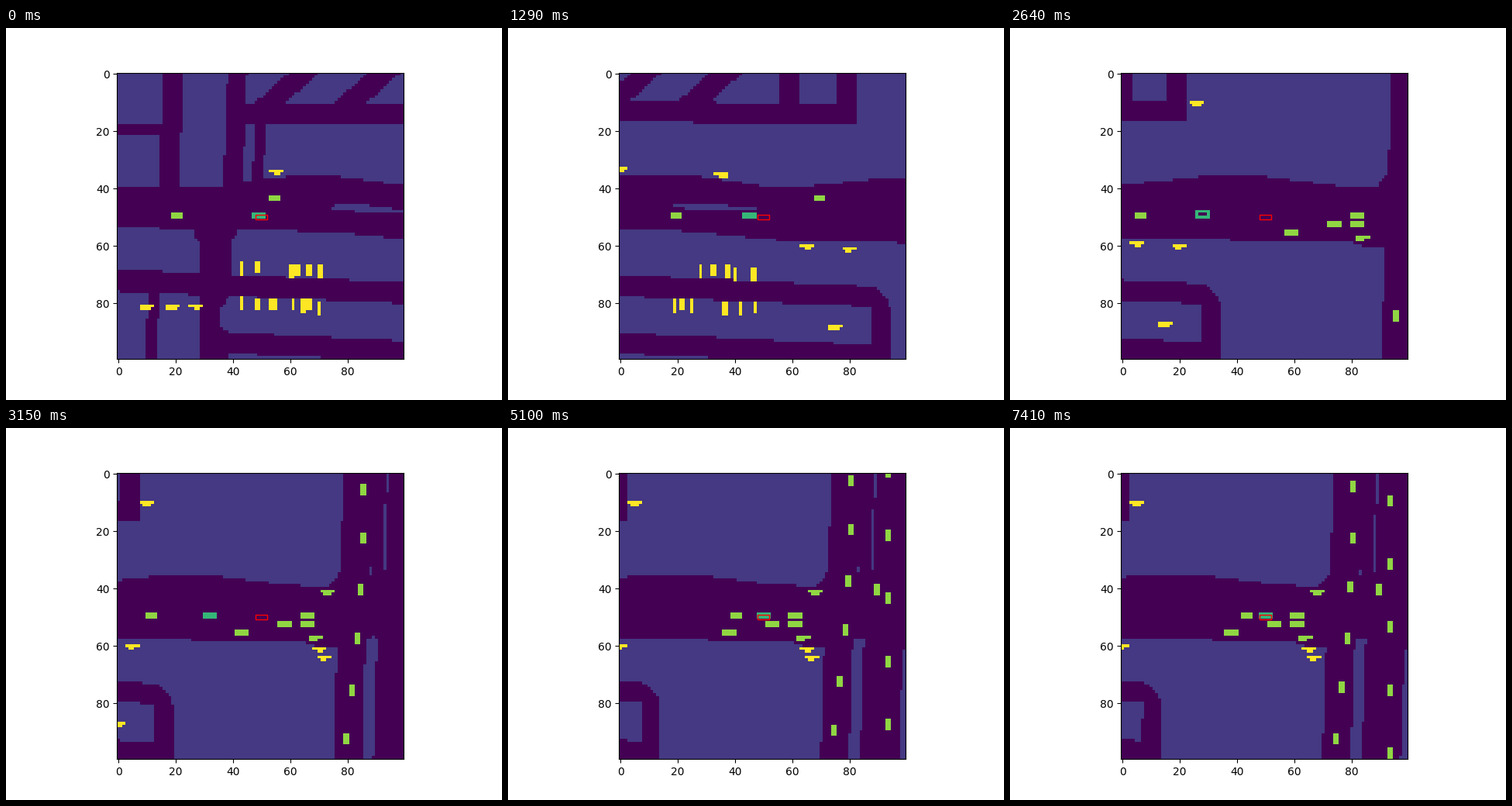
A matplotlib script for the animation above (7.44 s loop, 640x480 px).

```python
import random

import numpy as np
import matplotlib.pyplot as plt
from matplotlib.animation import FuncAnimation
from matplotlib.patches import Rectangle

N, FRAMES, STEP = 100, 248, 30
EGO, CAR, PED = 4, 5, 6
random.seed(4)


def curve(x, *knots):
    xs, ys = zip(*knots)
    return np.interp(x, xs, ys)


# Camera: forward travel, sideways drift and heading for every frame
t = np.arange(FRAMES)
speed = curve(t, (43, 1.28), (70, 1.41), (88, 1.2), (122, 0))
travel = np.concatenate([[0], np.cumsum((speed[1:] + speed[:-1]) / 2)])
drift = curve(t, (0, 0.65), (19, 0.6), (43, 0), (88, -1), (129, -1.2))
heading = curve(t, (129, 0), (190, 0.007))

# Recorded car and the one behind it, in screen cells
ego_x = curve(t, (0, 47), (19, 47), (43, 43), (88, 26), (129, 36), (165, 48))
tail_x = curve(t, (0, 18.5), (43, 18), (88, 5), (129, 18), (175, 42))


# Curbs of the streets that run along the drive
def main_north(x):
    return curve(x, (36, 39.3), (44, 37.4), (60, 35.7), (77, 35.7), (84, 36.5),
                 (105, 39.6), (114, 40.2), (123, 39.5), (145, 37.2), (155, 37),
                 (166, 37.5), (190, 40.5), (204, 40.8))


def main_south(x):
    return curve(x, (0, 53.2), (28, 54.4), (62, 54.8), (81, 55.7), (100, 57.6),
                 (106, 58.4), (143, 59.3), (195, 60.4), (199, 61.3), (201, 62.5))


def back_north(x):
    return 68.1 + 0.0465 * x


def back_south(x):
    return 75.8 + 0.042 * x


def between(low, v, high):
    return (low < v) & (v < high)


def roads(x, y):
    tilt = x + 0.04 * (y - 8)
    slant = x + 1.13 * y
    upper = y < 39

    # Along the drive
    road = between(main_north(x), y, main_south(x))
    road |= between(9.3 + 0.0135 * x, y, 16.4 + 0.0135 * x) & between(40, x, 137.9)
    road |= between(17.4, y, 21.3) & (x < 18)

    # Side streets to the north
    road |= upper & (between(16, tilt, 23) | between(38.3, tilt, 45.2))
    road |= upper & (y > 15) & between(48.4, tilt, 52.3)
    road |= (y < 12) & (between(59.4, slant, 70.2) | between(87.1, slant, 98.4))
    road |= (y < 12) & (between(111, x, 118.5) | between(131, x, 137.9))

    # Side streets to the south
    flare = np.clip(4 - np.abs(y - 54), 0, 2)
    right = curve(y, (70, 40.3), (78, 39), (82, 36), (88, 36), (90, 39))
    road |= (y > 53) & between(28.6 - flare, x, right + flare)
    road |= (y > 76) & between(10.8, x + 0.07 * (y - 81), 14.8)

    # Two back streets joined by a rounded loop
    bend = (x < 140) | (y > 84) | (np.hypot(x - 140, y - 84) < 9.8)
    road |= bend & (x < 149.8) & between(back_north(x), y, back_south(x))
    road |= bend & between(143, x, 149.8) & (y > 74)
    road |= between(36, x, 149.8) & between(88.2 + 0.0485 * x, y, 95.6 + 0.0455 * x)

    # Avenue at the end
    left = curve(y, (0, 209.2), (36, 208.1), (41, 204), (60, 204), (62, 206.9), (100, 205.8))
    road |= (x > left) & ((y < 61) | (x < 234.4 - 0.034 * (y - 61)))

    # Traffic islands
    half = curve(x, (74, 0), (77, 0.85), (88, 1.2), (95, 0.6), (106, 0.1), (107, 0))
    road &= np.abs(y - 46.4 - 0.045 * (x - 74)) >= half
    sag = 0.03 * (y - 60)
    road &= ~(between(216.9 - sag, x, 220.85 - sag) & (y > 58.4 + 0.6 * np.abs(x - 219.5)))
    road &= ~((np.abs(x - 224.5 + 0.036 * y) < 0.42) & (y < 36))
    road &= ~((np.abs(x - 219.9 + 0.035 * y) < 0.045) & between(20, y, 39))
    return road


# Rows of people on both sides of the back street: x, y, width, height, phase
people = []
for curb, offset in ((back_north, -5), (back_south, 0.2)):
    x = 43
    while x < 103:
        people.append((x, curb(x) + offset, random.randint(1, 2),
                       random.randint(4, 5), random.randrange(40)))
        x += random.randint(2, 6)

# Ragged groups at a few places in the world
groups = [(8, 80, PED), (17, 80, PED), (25, 80, PED), (53, 33, PED), (88, 35, PED),
          (118, 60, PED), (133, 61, PED), (128, 88, PED), (138.5, 11, PED),
          (198.5, 62.2, PED), (200, 65, PED), (197, 58.2, CAR), (201, 42.5, CAR)]
groups = [(x, y, kind, random.randint(0, 2), random.randint(2, 4))
          for x, y, kind in groups]

# Cars waiting before the junction
queue = [(194.6, 50.2), (194.6, 53.2), (186.6, 53.2), (171.6, 56.2)]

cols, rows = np.meshgrid(np.arange(N) + 0.5, np.arange(N) + 0.5)


def fill(grid, x, y, w, h, value):
    x, y = int(np.floor(x + 0.5)), int(np.floor(y + 0.5))
    grid[max(y, 0):max(y + h, 0), max(x, 0):max(x + w, 0)] = value


def flow(grid, n, lane, first, gap, v):
    """Evenly spaced cars on the avenue, moving at v cells per frame."""
    shift = travel[-1] - travel[n]
    start = (first + v * (n - FRAMES + 1)) % gap - gap
    for y in np.arange(start, N, gap):
        if lane(y) + shift < 97:
            fill(grid, lane(y) + shift, y, 2, 4, CAR)


def scene(n):
    x = cols + travel[n] + (rows - 50) * heading[n]
    y = rows - drift[n] - (cols - 50) * heading[n]
    grid = np.where(roads(x, y), 0, 1)

    for px, py, w, h, phase in people:
        sx = px - travel[n]
        if 15 <= sx < 75 and (n + phase) % 40 < 32:
            fill(grid, sx, py + drift[n], w, h, PED)
    for px, py, kind, indent, w in groups:
        sx, sy = px - travel[n], py + drift[n]
        if sx < 83:
            fill(grid, sx, sy, 5, 1, kind)
            fill(grid, sx + indent, sy + 1, w, 1, kind)
    for px, py in queue:
        sx = px - travel[n]
        if sx < 83:
            fill(grid, sx, py + drift[n], 5, 2, CAR)

    flow(grid, n, lambda y: 80.3 - y * y / 1300, 3, 17.5, 0.486)
    if n > 165:
        flow(grid, n, lambda y: 93, 8, 22, -0.44)
        fill(grid, 89, 39, 2, 4, CAR)
    if n < 66:
        fill(grid, (53 - 1.95 * n) % 99, 43, 4, 2, CAR)

    fill(grid, tail_x[n], 49, 4, 2, CAR)
    hollow = 70 <= n < 105
    fill(grid, ego_x[n], 48 if hollow else 49, 5, 3 if hollow else 2, EGO)
    if hollow:
        fill(grid, ego_x[n] + 1, 49, 3, 1, 0)
    return grid


fig, ax = plt.subplots(figsize=(6.4, 4.8), dpi=100)
image = ax.imshow(scene(0), vmin=0, vmax=6, cmap="viridis", interpolation="nearest")
ax.add_patch(Rectangle((48, 49.2), 4, 1.6, fill=False, edgecolor="red", linewidth=1))


def draw(n):
    image.set_data(scene(n))
    return [image]


anim = FuncAnimation(fig, draw, frames=FRAMES, interval=STEP, repeat=True)
plt.show()
```
